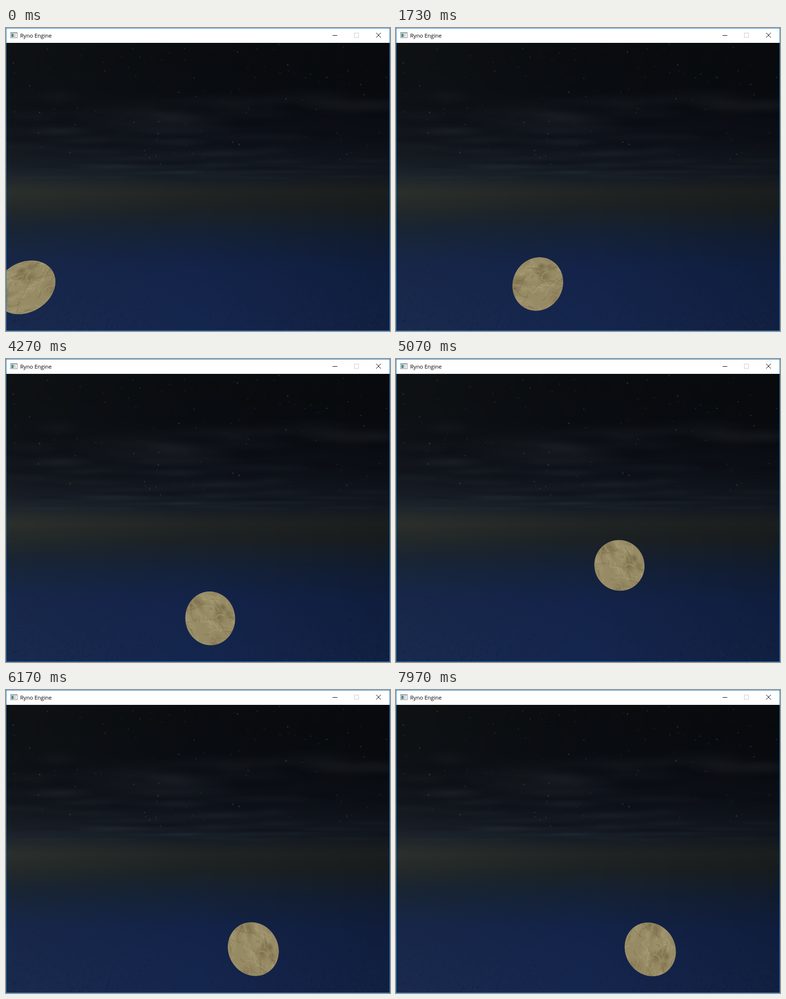
An HTML page with a canvas that plays this animation: 802x632 px, repeating every 8000 ms.

```html
<!DOCTYPE html>
<html lang="en">
<head>
<meta charset="utf-8">
<title>Ryno Engine</title>
<style>
  html, body { margin: 0; width: 100%; height: 100%; overflow: hidden; background: #000; }
  canvas { display: block; }
</style>
</head>
<body>
<canvas id="stage" width="802" height="632"></canvas>
<script>
const W = 802, H = 632, LOOP = 8, HORIZON = 320;
const RADIUS = 52, FOCAL = 520, EYE_X = 401, EYE_Y = 331;
const GROUND = 541, START_X = 40, GRAVITY = 1110, JUMP_SPEED = 505, RESTITUTION = .26;

function makeCanvas(w, h) {
  const canvas = document.createElement('canvas');
  canvas.width = w;
  canvas.height = h;
  return canvas;
}

function seeded(seed) {
  return () => (seed = (seed * 16807) % 2147483647) / 2147483647;
}

function fillGradient(ctx, x1, y1, colors) {
  const gradient = ctx.createLinearGradient(0, 0, x1, y1);
  for (const [stop, color] of colors) gradient.addColorStop(stop, color);
  ctx.fillStyle = gradient;
  ctx.fillRect(0, 0, W, H);
}

function softEllipse(ctx, x, y, rx, ry, rgb, alpha) {
  const glow = ctx.createRadialGradient(0, 0, 0, 0, 0, 1);
  glow.addColorStop(0, `rgba(${rgb},${alpha})`);
  glow.addColorStop(1, `rgba(${rgb},0)`);
  ctx.save();
  ctx.translate(x, y);
  ctx.scale(rx, ry);
  ctx.fillStyle = glow;
  ctx.fillRect(-1, -1, 2, 2);
  ctx.restore();
}

function drawSky(ctx) {
  const random = seeded(71);
  fillGradient(ctx, 0, H, [
    [0, '#0a0c0e'], [.2, '#090c11'], [.38, '#0e121a'], [.49, '#161c25'], [.54, '#202423'],
    [.59, '#1c2123'], [.68, '#142136'], [.79, '#132349'], [1, '#15264e']
  ]);
  fillGradient(ctx, W, 0, [
    [0, 'rgba(80,90,75,.07)'], [.5, 'rgba(70,80,70,0)'], [.5, 'rgba(0,0,0,0)'], [1, 'rgba(0,0,0,.18)']
  ]);
  softEllipse(ctx, 0, 345, 420, 65, '120,125,105', .09);
  softEllipse(ctx, 310, 182, 180, 38, '150,155,150', .07);

  // Clouds flatten and crowd together towards the horizon.
  for (let i = 0; i < 90; i++) {
    const rise = 170 * random() ** 1.5;
    const light = random() < .5;
    softEllipse(ctx, W * random(), HORIZON - 8 - rise, 50 + 110 * random(), 4 + rise / 11,
      light ? '130,140,145' : '0,3,10', light ? .045 : .13);
  }

  for (let i = 0; i < 110; i++) {
    const size = 1.3 + 1.2 * random();
    softEllipse(ctx, W * random(), 34 + 250 * random() ** 1.4, size, size, '140,150,150', .1 + .25 * random());
  }

  // Ripples spread outwards from the middle of the view.
  for (let i = 0; i < 2200; i++) {
    const x = W * random(), depth = 232 * Math.sqrt(random());
    const length = 1 + depth / 45;
    const alpha = (.06 + .16 * Math.abs(x / EYE_X - 1)) * depth / 232;
    ctx.strokeStyle = `rgba(${random() < .6 ? '3,10,24' : '50,70,110'},${alpha})`;
    ctx.beginPath();
    ctx.moveTo(x, 400 + depth);
    ctx.lineTo(x + (x - EYE_X) / (150 + depth) * length, 400 + depth + length);
    ctx.stroke();
  }
}

function drawWindow(ctx) {
  const rect = (color, x, y, w, h) => { ctx.fillStyle = color; ctx.fillRect(x, y, w, h); };
  rect('#fff', 0, 0, W, 31);

  rect('#8d9296', 9, 9, 15, 12);
  rect('#f4f5f5', 10, 11, 13, 9);
  rect('#4f918b', 11, 12, 5, 7);
  rect('#c9cdd0', 17, 12, 3, 7);

  ctx.fillStyle = '#000';
  ctx.font = '11.5px "Open Sans", "Noto Sans", sans-serif';
  ctx.fillText('Ryno Engine', 29.5, 20);

  rect('#000', 682, 15, 10, 1);
  ctx.strokeStyle = '#ccc';
  ctx.strokeRect(727.5, 10.5, 9, 9);
  ctx.strokeStyle = '#000';
  ctx.beginPath();
  ctx.moveTo(773, 10); ctx.lineTo(783, 20);
  ctx.moveTo(783, 10); ctx.lineTo(773, 20);
  ctx.stroke();

  ctx.strokeStyle = '#1883d7';
  ctx.strokeRect(.5, .5, W - 1, H - 1);
}

function makeBall() {
  const canvas = makeCanvas(RADIUS * 4, RADIUS * 4);
  const ctx = canvas.getContext('2d');
  const random = seeded(29);
  const spread = size => (random() - .5) * size;
  ctx.scale(2, 2);
  ctx.translate(RADIUS, RADIUS);
  ctx.beginPath();
  ctx.arc(0, 0, RADIUS, 0, 7);
  ctx.fillStyle = '#978b65';
  ctx.fill();
  ctx.clip();

  for (let i = 0; i < 26; i++) {
    softEllipse(ctx, spread(95), spread(95), 10 + 14 * random(), 6 + 9 * random(),
      i % 2 ? '178,167,126' : '112,97,63', .35);
  }
  ctx.lineCap = 'round';
  for (let i = 0; i < 100; i++) {
    const x = spread(100), y = spread(100), angle = spread(2) - .35;
    const length = 6 + 15 * random(), bend = spread(12);
    const dx = Math.cos(angle) * length, dy = Math.sin(angle) * length;
    ctx.strokeStyle = i % 2 ? 'rgba(184,174,132,.3)' : 'rgba(108,92,60,.25)';
    ctx.lineWidth = .8 + 2 * random();
    ctx.beginPath();
    ctx.moveTo(x, y);
    ctx.quadraticCurveTo(x + dx / 2 + bend, y + dy / 2 + bend, x + dx, y + dy);
    ctx.stroke();
  }
  softEllipse(ctx, 1, -35, 11, 7, '84,72,44', .55);
  return canvas;
}

// Sideways speed (time, px/s) changes evenly between keys; a repeated time is a rebound.
const SPEED = [
  [0, 0], [.27, 0], [1.1, 185], [1.64, 380], [1.73, 212], [1.93, 172], [2.21, 0], [2.7, 0],
  [3.2, 95], [3.6, 29], [4.69, 29], [5.738, 274], [5.738, -210], [6.775, -99], [6.775, 120], [8, 35]
];
const JUMPS_MS = [740, 4705, 5075];

function travelAt(t) {
  let x = START_X;
  for (let i = 1; i < SPEED.length && SPEED[i - 1][0] < t; i++) {
    const [t0, v0] = SPEED[i - 1], [t1, v1] = SPEED[i];
    if (t1 === t0) continue;
    const s = Math.min(t, t1) - t0;
    x += v0 * s + (v1 - v0) / (t1 - t0) * s * s / 2;
  }
  return x;
}

function heightAt(t) {
  const dt = .001;
  let height = 0, speed = 0;
  for (let ms = 0; ms < t * 1000; ms++) {
    if (JUMPS_MS.includes(ms)) speed = JUMP_SPEED;
    height += speed * dt - GRAVITY * dt * dt / 2;
    speed -= GRAVITY * dt;
    if (height < 0) {
      height = 0;
      speed = speed < -200 ? -speed * RESTITUTION : 0;
    }
  }
  return height;
}

const spinAt = t => (16 * t - 18) * Math.PI / 180;

const stage = document.getElementById('stage').getContext('2d');
const ball = makeBall();
const backdrop = makeCanvas(W, H);
const frame = makeCanvas(W, H);
drawSky(backdrop.getContext('2d'));
drawWindow(frame.getContext('2d'));

function draw(now) {
  const t = now / 1000 % LOOP;
  const x = travelAt(t), y = GROUND - heightAt(t);
  const dx = x - EYE_X, dy = y - EYE_Y;
  const outward = Math.atan2(dy, dx);

  stage.drawImage(backdrop, 0, 0);
  stage.save();
  stage.translate(x, y);
  // Perspective stretches the ball away from the middle of the view.
  stage.rotate(outward);
  stage.scale(Math.hypot(1, Math.hypot(dx, dy) / FOCAL), 1);
  stage.rotate(spinAt(t) - outward);
  stage.drawImage(ball, -RADIUS, -RADIUS, RADIUS * 2, RADIUS * 2);
  stage.restore();
  stage.drawImage(frame, 0, 0);
}

const begin = performance.now();
function tick() {
  draw(performance.now() - begin);
  requestAnimationFrame(tick);
}
tick();
</script>
</body>
</html>
```
